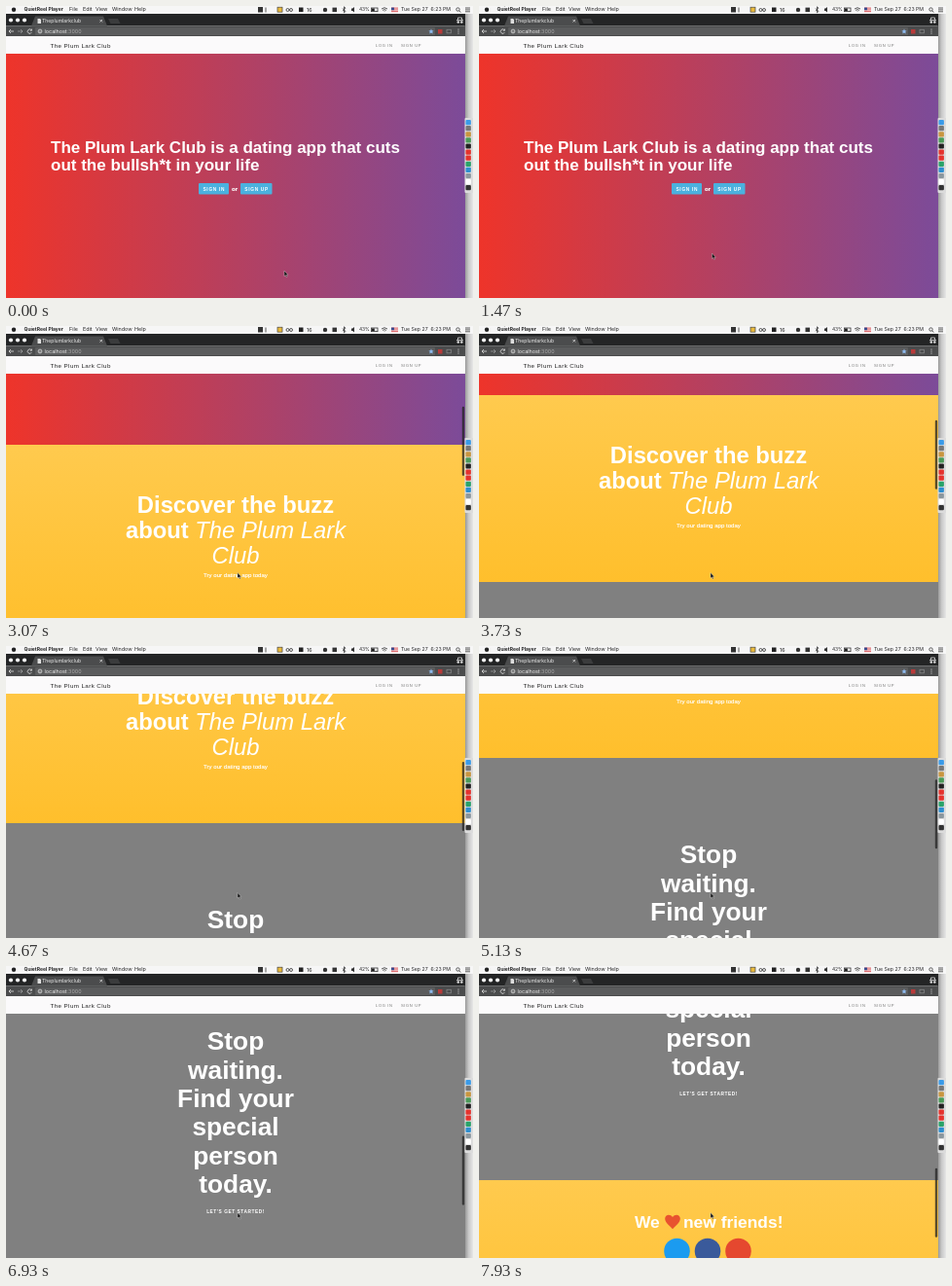
An HTML page that plays this animation: 480x300 px, repeating every 8000 ms.

```html
<!DOCTYPE html>
<html lang="en">
<head>
<meta charset="utf-8">
<title>Landing page scroll</title>
<style>
  html, body { margin: 0; width: 100%; height: 100%; overflow: hidden; background: #fff; }
  svg { display: block; }
  #stage { width: 100vw; height: 100vh; }
  text { font-family: "Liberation Sans", Arial, sans-serif; fill: #fff; }
  .ui text { font-family: Inter, "Open Sans", sans-serif; font-size: 5.4px; fill: #222; }
  .ui .tab { font-size: 5.1px; fill: #eee; }
  .ui .light { fill: #eee; }
  .mid { text-anchor: middle; }
  .bold { font-weight: 700; }
  .title { font-size: 17px; }
  .buzz { font-size: 23.8px; }
  .stop { font-size: 26.3px; }
  .small { font-size: 6.1px; stroke: #fff; stroke-width: .15; }
  .caps { font-size: 4.8px; letter-spacing: .68px; }
  .love { font-size: 17.4px; }
  .nav text { fill: #222; }
  .nav .link { font-size: 4.1px; letter-spacing: .6px; fill: #777; }
  .line { fill: none; stroke: #333; stroke-width: .8; }
  .pale { fill: none; stroke: #ddd; stroke-width: .8; }
</style>
</head>
<body>
<svg id="stage" viewBox="0 0 480 300" preserveAspectRatio="none">
  <defs>
    <linearGradient id="sunset"><stop stop-color="#ee342a"/><stop offset=".5" stop-color="#b54060"/><stop offset="1" stop-color="#7c4b99"/></linearGradient>
    <linearGradient id="honey" x2="0" y2="1"><stop stop-color="#ffca4e"/><stop offset="1" stop-color="#ffbf2c"/></linearGradient>
    <linearGradient id="shade"><stop stop-color="#8c8c8c"/><stop offset=".5" stop-color="#c8c8c8"/><stop offset="1" stop-color="#e6e6e6"/></linearGradient>
  </defs>
  <rect x="471" width="9" height="300" fill="url(#shade)"/>

  <!-- page -->
  <svg y="31" width="472" height="269" viewBox="0 31 472 269">
    <g id="page">
      <rect y="31" width="472" height="270" fill="url(#sunset)"/>
      <g class="bold">
        <g class="title">
          <text x="46" y="151.3">The Plum Lark Club is a dating app that cuts</text>
          <text x="46" y="169.3">out the bullsh*t in your life</text>
        </g>
        <rect x="198" y="182" width="31" height="11.5" rx="1" fill="#4bb1de"/>
        <rect x="241" y="182" width="32.5" height="11.5" rx="1" fill="#4bb1de"/>
        <g class="caps mid">
          <text x="213.8" y="189.6">SIGN IN</text>
          <text x="257.6" y="189.6">SIGN UP</text>
        </g>
        <text class="small mid" x="235" y="189.8">or</text>
      </g>

      <rect y="301" width="472" height="192" fill="url(#honey)"/>
      <g class="buzz bold mid">
        <text x="236" y="371.4">Discover the buzz</text>
        <text x="236" y="397.2">about <tspan font-style="italic" font-weight="400">The Plum Lark</tspan></text>
        <text x="236" y="423" font-style="italic" font-weight="400">Club</text>
      </g>
      <text class="small mid" x="236" y="437.4">Try our dating app today</text>

      <rect y="493" width="472" height="363" fill="#808080"/>
      <g id="stop" class="stop bold mid"></g>
      <text class="caps bold mid" x="236" y="768.7" style="letter-spacing:.55px">LET'S GET STARTED!</text>

      <rect y="856" width="472" height="190" fill="url(#honey)"/>
      <g class="love bold">
        <text x="160" y="905">We</text>
        <text x="210" y="905">new friends!</text>
      </g>
      <path transform="translate(199 899) scale(.92)" d="M0 8 C-5 3 -8.500 0 -8.500 -3.700 C-8.500 -8.500 -2.500 -9.500 0 -5.300 C2.500 -9.500 8.500 -8.500 8.500 -3.700 C8.500 0 5 3 0 8Z" fill="#e8522f"/>
      <circle cx="203.500" cy="929" r="13.300" fill="#1b9bf0"/>
      <circle cx="235" cy="929" r="13.300" fill="#3a5a9b"/>
      <circle cx="266.500" cy="929" r="13.300" fill="#e5482f"/>
    </g>
  </svg>
  <rect id="thumb" x="468.800" width="2.400" height="71" rx="1.200" fill="#222" opacity=".75"/>

  <!-- fixed navigation -->
  <g class="nav">
    <rect y="31" width="472" height="18" fill="#fbfafb"/>
    <text x="45.500" y="42.500" style="font-size:6.2px;letter-spacing:.42px">The Plum Lark Club</text>
    <text class="link" x="380" y="41.800">LOG IN</text>
    <text class="link" x="406" y="41.800">SIGN UP</text>
  </g>

  <!-- browser frame -->
  <g class="ui">
    <rect y="8" width="472" height="12.500" fill="#242526"/>
    <path d="M26 20.500 L30 10.500 H100 L104 20.500Z" fill="#4b4c4d"/>
    <rect y="20.500" width="472" height="10.500" fill="#4b4c4d"/>
    <rect x="30" y="22" width="411" height="8" rx="1" fill="#5b5c5d"/>
    <g fill="#f4f4f4"><circle cx="5" cy="14.500" r="2.100"/><circle cx="12" cy="14.500" r="2.100"/><circle cx="19" cy="14.500" r="2.100"/></g>
    <path d="M32.500 13 h2.500 l1 1 v4 h-3.500Z" fill="#ddd"/>
    <text class="tab" x="37" y="17.400">Theplumlarkclub</text>
    <path class="pale" d="M96.500 14 l2.500 2.500 m0 -2.500 l-2.500 2.500"/>
    <path d="M105 13 h10 l2.500 5 h-10Z" fill="#3b3c3d"/>
    <path d="M463 14.500 h7 m-5.500 -.5 v-2 h4 v2" class="pale"/>
    <circle cx="464.800" cy="16.500" r="1.300" fill="#ddd"/><circle cx="468.300" cy="16.500" r="1.300" fill="#ddd"/>
    <path class="pale" d="M8 26 h-5 m2 -2 l-2 2 l2 2"/>
    <path class="pale" opacity=".5" d="M12 26 h5 m-2 -2 l2 2 l-2 2"/>
    <path class="pale" d="M26.300 25 a2.200 2.200 0 1 0 .1 2 m0 -3.500 v1.700 h-1.700"/>
    <circle class="pale" cx="35" cy="26" r="1.900"/><path class="pale" d="M35 25.600 v1.500"/>
    <text class="light" x="39.500" y="28">localhost<tspan fill="#aaa">:3000</tspan></text>
    <path d="M437 23.500 l.8 1.700 1.800 .2 -1.300 1.200 .4 1.800 -1.700 -.9 -1.700 .9 .4 -1.800 -1.300 -1.200 1.800 -.2Z" fill="#8fbcf0"/>
    <rect x="444" y="24" width="4.500" height="4.500" fill="#b83a3a"/>
    <rect class="pale" opacity=".4" x="453" y="24.300" width="4.500" height="3.500"/>
    <g fill="#ddd"><circle cx="465" cy="24" r=".6"/><circle cx="465" cy="26" r=".6"/><circle cx="465" cy="28" r=".6"/></g>

    <!-- system menu bar -->
    <rect width="480" height="8" fill="#f6f6f6"/>
    <circle cx="8" cy="3.800" r="2.200" fill="#222"/>
    <text class="bold" x="18.500" y="5.400" style="font-size:5px">QuietReel Player</text>
    <text x="65" y="5.400">File</text>
    <text x="79" y="5.400">Edit</text>
    <text x="92" y="5.400">View</text>
    <text x="109" y="5.400">Window</text>
    <text x="132" y="5.400">Help</text>
    <rect x="259" y="1" width="5" height="5.500" fill="#333"/><path class="line" d="M267 1.500 v5"/>
    <rect x="279" y="1.200" width="5" height="5" fill="#e8b93c" stroke="#444" stroke-width=".7"/>
    <circle class="line" cx="289.500" cy="4" r="1.500"/><circle class="line" cx="293" cy="4" r="1.500"/>
    <rect x="301" y="1.500" width="4.500" height="4.500" fill="#222"/>
    <text x="309" y="5.500">16</text>
    <circle cx="328" cy="3.900" r="2.200" fill="#333"/>
    <rect x="335.500" y="1.600" width="4.500" height="4.500" fill="#333"/>
    <path class="line" d="M346 2.500 l3 3 -1.500 1.300 v-6 l1.500 1.400 -3 3"/>
    <path d="M355 5 h1.200 l1.800 1.500 v-5.500 l-1.800 1.500 h-1.200Z" fill="#333"/>
    <text id="battery" x="363" y="5.400" style="font-size:4.800px">43%</text>
    <rect class="line" x="375.500" y="2" width="6.500" height="3.600"/><rect x="376" y="2.500" width="2.800" height="2.600" fill="#222"/>
    <path class="line" d="M386 3 q3 -2.600 6 0 m-4.800 1.400 q1.800 -1.500 3.600 0 m-2 1.200 h.5"/>
    <rect x="396" y="1.600" width="7" height="4.700" fill="#fff"/>
    <path d="M396 2.100 h7 m-7 1.800 h7 m-7 1.800 h7" stroke="#d33b40" stroke-width=".9"/>
    <rect x="396" y="1.600" width="3" height="2.600" fill="#3a4a8c"/>
    <text x="406" y="5.400" style="font-size:5.200px">Tue Sep 27&nbsp; 6:23 PM</text>
    <circle class="line" cx="464.500" cy="3.500" r="1.700"/><path class="line" d="M465.700 4.800 l1.700 1.700"/>
    <path class="line" d="M472 2 h5 m-5 1.900 h5 m-5 1.900 h5"/>
  </g>

  <!-- dock -->
  <rect x="471.500" y="115" width="9" height="77" rx="1" fill="#dcdcdc"/>
  <g id="dock"></g>

  <path id="cursor" d="M0 -3 v5.600 l1.300 -1.100 .9 2 .9 -.4 -.9 -1.900 h1.700Z" fill="#111" stroke="#eee" stroke-width=".35"/>
</svg>

<script>
const LOOP = 8000, STEP = LOOP / 120;
const $ = id => document.getElementById(id);

$('stop').innerHTML = ['Stop', 'waiting.', 'Find your', 'special', 'person', 'today.']
  .map((word, i) => `<text x="236" y="${601.2 + 29.4 * i}">${word}</text>`).join('');

$('dock').innerHTML = ['#3a9be8', '#777', '#c9963f', '#4a9a58', '#222', '#e5322d', '#e5322d', '#29a36a', '#2f8fd0', '#8b979e', '#fff', '#333']
  .map((color, i) => `<rect x="472.500" y="${117 + 6.1 * i}" width="5.400" height="5.200" rx="1" fill="${color}"/>`).join('');

const linear = p => p;
const start = p => p ** 1.3;
const settle = p => 1 - (1 - p) ** 2.2;
const glide = p => p * p * (3 - 2 * p);

// [time, scroll offset, easing towards this step]
const scrollSteps = [
  [1870, 0, linear], [2200, 79, start], [2600, 115, settle],
  [2800, 115, linear], [3066, 179, start], [3500, 230, settle],
  [4360, 230, linear], [4666, 311, start], [5400, 386, settle],
  [5600, 386, linear], [5800, 414, start], [6266, 470, settle],
  [6666, 470, linear], [6933, 515, start], [7200, 562, settle],
  [7666, 562, linear], [7933, 636, start]
];

function valueAt(steps, t) {
  let [from, a] = [0, steps[0][1]];
  for (const [to, b, ease] of steps) {
    if (t < to) return a + (b - a) * ease((t - from) / (to - from));
    [from, a] = [to, b];
  }
  return a;
}

function render(time) {
  // Steps begin on whole hundredths of a second, up to 5 ms early.
  const t = Math.floor((time % LOOP + 5) / STEP) * STEP % LOOP;
  const scroll = Math.round(valueAt(scrollSteps, t));
  const move = glide(Math.min(1, Math.max(0, (t - 930) / 600)));
  $('page').setAttribute('transform', `translate(0 ${-scroll})`);
  $('thumb').setAttribute('y', 34 + scroll * .273);
  $('thumb').style.display = scroll ? '' : 'none';
  $('battery').textContent = t < 5660 ? '43%' : '42%';
  $('cursor').setAttribute('transform', `translate(${286 - 48 * move} ${275 - 18.5 * move})`);
}

const origin = performance.now();
function tick() {
  render(performance.now() - origin);
  requestAnimationFrame(tick);
}
tick();
</script>
</body>
</html>
```
